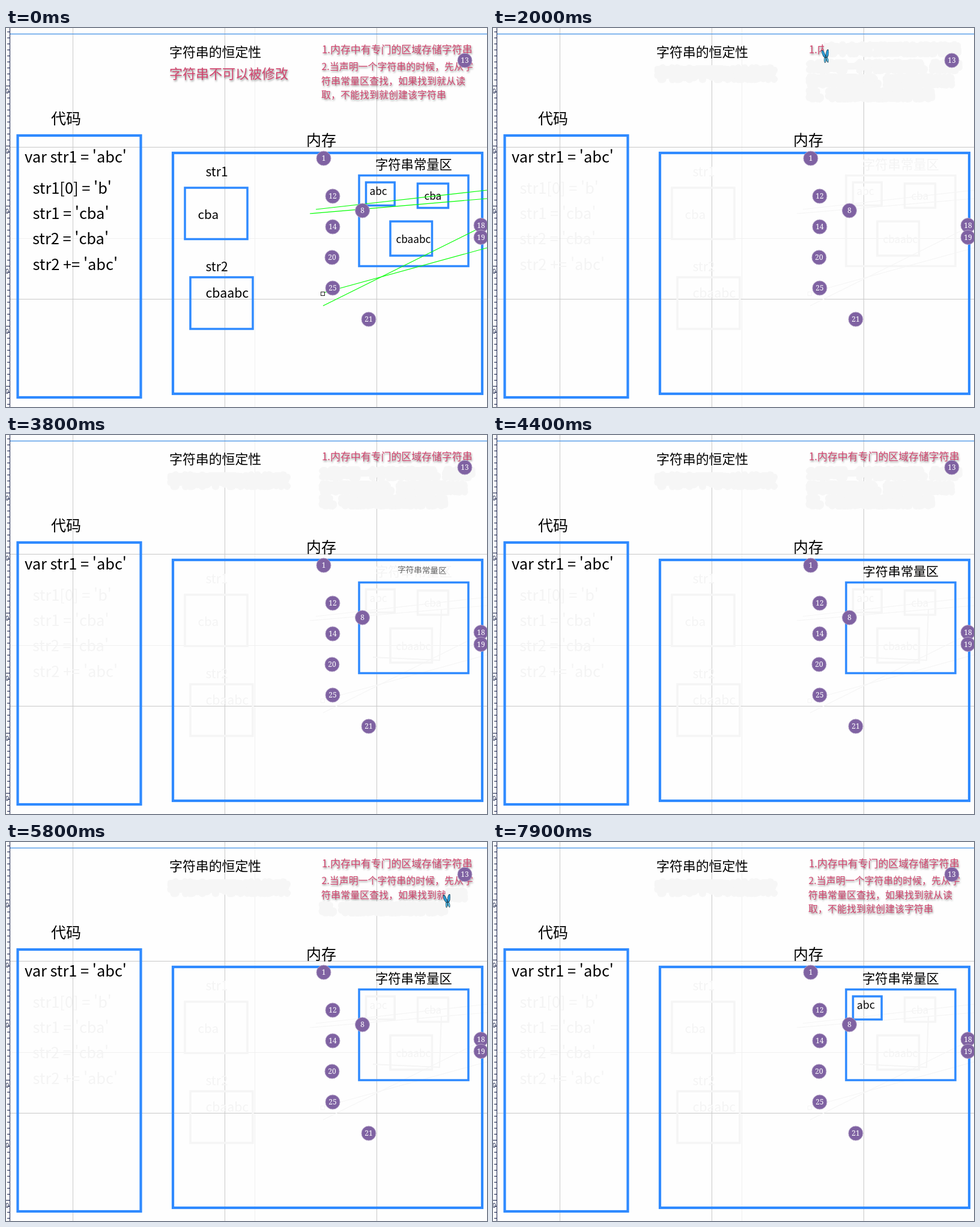
Animation, 801 px wide and 631 px high, one loop 8000 ms. Source, as an HTML page:

```html
<!DOCTYPE html>
<html lang="zh-CN">
<head>
<meta charset="utf-8">
<style>
html, body { margin: 0; width: 100%; height: 100%; overflow: hidden; background: #fefefe; }
svg { display: block; }
text { font-family: "Noto Sans CJK SC", "Noto Sans CJK JP", "Noto Sans", sans-serif; white-space: pre; }
.box { fill: none; stroke: #2f8aff; stroke-width: 3.5; }
.frame { stroke-width: 4.2; }
.wire { stroke: #00ff00; stroke-width: 1.1; }
.pink { fill: #d2466f; filter: drop-shadow(1px 2px 1.5px rgba(0,0,0,.45)); }
.badge circle { fill: #7f62a2; stroke: #b5a4c8; stroke-width: 1; }
.badge text { font: 12px "Noto Serif", "Liberation Serif", serif; fill: #fff; text-anchor: middle; }
.ghost text { fill: #f4f4f4; }
.ghost .box, .ghost .wire, .ghost .handle { stroke: #f5f5f5; }
.cloud { fill: #f6f6f6; stroke: #f6f6f6; stroke-width: 10; stroke-linejoin: round; }
</style>
</head>
<body>
<svg id="stage" width="801" height="631" viewBox="0 0 801 631"></svg>
<script>
const LOOP = 8000, STEP = 100, CLEAR = 1000;
const stage = document.getElementById('stage');

const text = (x, y, size, str, cls = '') =>
  `<text x="${x}" y="${y}" font-size="${size}" class="${cls}">${str}</text>`;
const box = (x1, y1, x2, y2, cls = '') =>
  `<rect x="${x1}" y="${y1}" width="${x2 - x1}" height="${y2 - y1}" class="box ${cls}"/>`;
const line = (x1, y1, x2, y2, attrs) =>
  `<line x1="${x1}" y1="${y1}" x2="${x2}" y2="${y2}" ${attrs}/>`;
const group = (id, body, attrs = '') => `<g id="${id}" ${attrs}>${body}</g>`;
const badge = (x, y, n) =>
  `<g class="badge"><circle cx="${x}" cy="${y}" r="12"/><text x="${x}" y="${y + 4}">${n}</text></g>`;

const declare = text(31, 224, 25.4, "var str1 = 'abc'");
const zone = box(588, 245.5, 770, 396.5);
const zoneName = text(615, 235, 21.3, '字符串常量区');
const cell = box(599.5, 257, 647.2, 295.5);
const cellText = text(605.5, 278, 17.2, 'abc');
const headline = cls => text(272, 84, 22, '字符串不可以被修改', cls);

const diagram = [
  declare, zone, zoneName, cell, cellText,
  text(44.5, 276, 25.4, "str1[0] = 'b'"),
  text(44.5, 318, 25.4, "str1 = 'cba'"),
  text(44, 360, 25.4, "str2 = 'cba'"),
  text(44.5, 403, 25.4, "str2 += 'abc'"),
  text(332.5, 247, 21, 'str1'), box(298, 266, 402, 351.5), text(319.5, 318, 20.6, 'cba'),
  text(332.5, 405, 21, 'str2'), box(307, 415, 411, 501), text(332.5, 449, 21.3, 'cbaabc'),
  box(685.5, 259, 736.5, 299.5), text(696.5, 286, 17.2, 'cba'),
  box(640, 322, 709.5, 379), text(649.5, 358, 17.2, 'cbaabc'),
  line(516, 302, 801, 270, 'class="wire"'),
  line(506, 309, 801, 284, 'class="wire"'),
  line(528, 441, 801, 366, 'class="wire"'),
  line(528, 462.5, 801, 327, 'class="wire"'),
  '<rect x="524.5" y="439.5" width="6" height="6" fill="#fff" stroke="#222" class="handle"/>'
].join('');

// Each note line: position, size, width, and when its wipe starts and how fast (px/ms).
const notes = [
  { x: 526, y: 42, size: 16.9, w: 251, str: '1.内存中有专门的区域存储字符串', start: 1920, speed: .315 },
  { x: 525.5, y: 70, size: 15.95, w: 253, str: '2.当声明一个字符串的时候，先从字', start: 4650, speed: .4 },
  { x: 525, y: 93.5, size: 16, w: 240, str: '符串常量区查找，如果找到就从读' },
  { x: 525, y: 117, size: 16, w: 208, str: '取，不能找到就创建该字符串' }
];
notes.forEach((n, i) => {
  if (n.start) return;
  const prev = notes[i - 1];
  n.speed = prev.speed;
  n.start = prev.start + prev.w / prev.speed;
});

function ruler() {
  let out = '<path d="M6.5 0V631" stroke="#16204a"/>';
  for (let y = 6.5; y < 631; y += 10) out += line(y % 100 === 96.5 ? 0 : 2, y, 6, y, 'stroke="#16204a"');
  for (let y = 109; y < 631; y += 100) out += `<text x="-1" y="${y}" font-size="11" fill="#16204a">0</text>`;
  return out;
}

function grid() {
  let out = line(414.5, 0, 414.5, 631, 'stroke="#f0f0f0"') + line(7, 350.5, 801, 350.5, 'stroke="#f0f0f0"');
  for (const x of [111.5, 364.5, 617.5]) out += line(x, 0, x, 631, 'stroke="#c9c9c9"');
  for (const y of [198.5, 451.5]) out += line(7, y, 801, y, 'stroke="#c9c9c9"');
  return out + line(7, 10, 801, 10, 'stroke="#5b9fe9" stroke-width="1.6"');
}

const noteMarkup = notes.map((n, i) => `
  <clipPath id="shown${i}"><rect id="shownRect${i}" x="${n.x - 5}" y="${n.y - 22}" height="34"/></clipPath>
  <clipPath id="rest${i}"><rect id="restRect${i}" y="${n.y - 24}" width="300" height="38"/></clipPath>
  <g class="clouds" clip-path="url(#rest${i})">${text(n.x, n.y, n.size, n.str, 'cloud')}</g>
  <g clip-path="url(#shown${i})">${text(n.x, n.y, n.size, n.str, 'pink')}</g>`).join('');

const wing = `<path d="M0 1C2-8 8-13 13-11C14-5 9 1 1 2Z" fill="#2b9bd6"/>
  <path d="M0 1C6 0 10 4 7 9C4 11 1 6 0 1Z" fill="#56bde6"/>`;
const butterfly = `<g stroke="#15303f" stroke-width="1">${wing}<g transform="scale(-1 1)">${wing}</g>
  <path d="M0-4V8" stroke-width="1.8"/></g>`;

stage.innerHTML = grid() + ruler()
  + group('ghost', diagram + headline('cloud')
      + '<path d="M725 290L722 375L611 370" fill="none" class="box" style="stroke-width:2" id="trace"/>', 'class="ghost"')
  + text(272, 47.5, 21.9, '字符串的恒定性') + text(75, 159.5, 25, '代码') + text(500, 195.5, 25, '内存')
  + box(19.5, 179, 224.5, 615, 'frame') + box(278, 208, 793, 609, 'frame')
  + group('full', diagram + headline('pink'))
  + group('declare', declare) + group('zone', zone) + group('zoneName', zoneName)
  + group('cell', cell) + group('cellText', cellText)
  + noteMarkup
  + [[529, 217, 1], [544, 280, 12], [593.5, 304, 8], [544, 331, 14], [543, 382, 20], [544, 433, 25],
     [604, 485, 21], [791, 328.5, 18], [791, 348.5, 19], [764, 54, 13]].map(b => badge(...b)).join('')
  + group('butterfly', butterfly);

const el = id => document.getElementById(id);
const show = (id, on) => el(id).setAttribute('display', on ? 'inline' : 'none');
const clamp = (v, lo, hi) => Math.min(hi, Math.max(lo, v));

// Linear interpolation through [time, value, value...] rows.
function track(rows, u) {
  const i = clamp(rows.findIndex(r => r[0] > u), 1, rows.length - 1);
  const next = u >= 1 ? rows.length - 1 : i;
  const a = rows[next - 1], b = rows[next];
  const k = clamp((u - a[0]) / (b[0] - a[0]), 0, 1);
  return a.slice(1).map((v, j) => v + (b[j + 1] - v) * k);
}

// time, scale x, scale y
const RUBBER = [[0, 1, 1], [.3, 1.25, .75], [.4, .75, 1.25], [.5, 1.15, .85],
  [.65, .95, 1.05], [.75, 1.05, .95], [1, 1, 1]];
// time, scale, rotation, shift in widths
const POP = [[0, .4, 0, .15], [.15, .64, 1.5, .11], [.25, .85, 1, .07], [.4, 1.035, -1.8, .025],
  [.55, 1.03, .8, .012], [.75, .99, -.3, 0], [1, 1, 0, 0]];

const pops = [
  { id: 'zone', cx: 679, cy: 321, w: 182, start: 2700, span: 960 },
  { id: 'zoneName', cx: 679, cy: 227, w: 127, start: 3650, span: 1000 },
  { id: 'cell', cx: 623.4, cy: 276.2, w: 48, start: 6410, span: 1000 },
  { id: 'cellText', cx: 620, cy: 272, w: 29, start: 7500, span: 1000 }
];

function render(t) {
  const whole = t < CLEAR;
  show('full', whole);
  show('ghost', !whole);
  show('trace', t >= 3000);

  show('declare', t >= 1400);
  const [sx, sy] = track(RUBBER, clamp((t - 1400) / 500, 0, 1));
  el('declare').setAttribute('transform', `translate(117 215) scale(${sx} ${sy}) translate(-117 -215)`);

  for (const p of pops) {
    const u = clamp((t - p.start) / p.span, 0, 1);
    show(p.id, u > 0);
    const [s, rot, shift] = track(POP, u);
    el(p.id).setAttribute('transform',
      `translate(${p.cx + shift * p.w} ${p.cy - shift * 20}) rotate(${rot}) scale(${s}) translate(${-p.cx} ${-p.cy})`);
    el(p.id).setAttribute('opacity', Math.min(1, .4 + 1.4 * u));
  }

  let writing = null;
  notes.forEach((n, i) => {
    const drawn = whole ? n.w : clamp((t - n.start) * n.speed, 0, n.w);
    const done = drawn >= n.w;
    el('shownRect' + i).setAttribute('width', drawn > 0 ? drawn + (done ? 15 : 5) : 0);
    el('restRect' + i).setAttribute('x', drawn > 0 ? n.x + drawn : n.x - 10);
    el('restRect' + i).setAttribute('width', done ? 0 : 300);
    if (!whole && drawn > 0 && !done) writing = { x: n.x + drawn, y: n.y - 6 };
  });

  show('butterfly', writing);
  if (writing) {
    const flap = Math.cos((t - 5000) / 545.45 * 2 * Math.PI);
    el('butterfly').setAttribute('transform',
      `translate(${writing.x + 3} ${writing.y + 2 - 10 * flap}) rotate(${5 + 12 * flap}) scale(${.72 + .28 * flap} 1)`);
  }
}

function tick(now) {
  render(Math.floor((now % LOOP) / STEP) * STEP);
  requestAnimationFrame(tick);
}
render(0);
requestAnimationFrame(tick);
</script>
</body>
</html>
```
